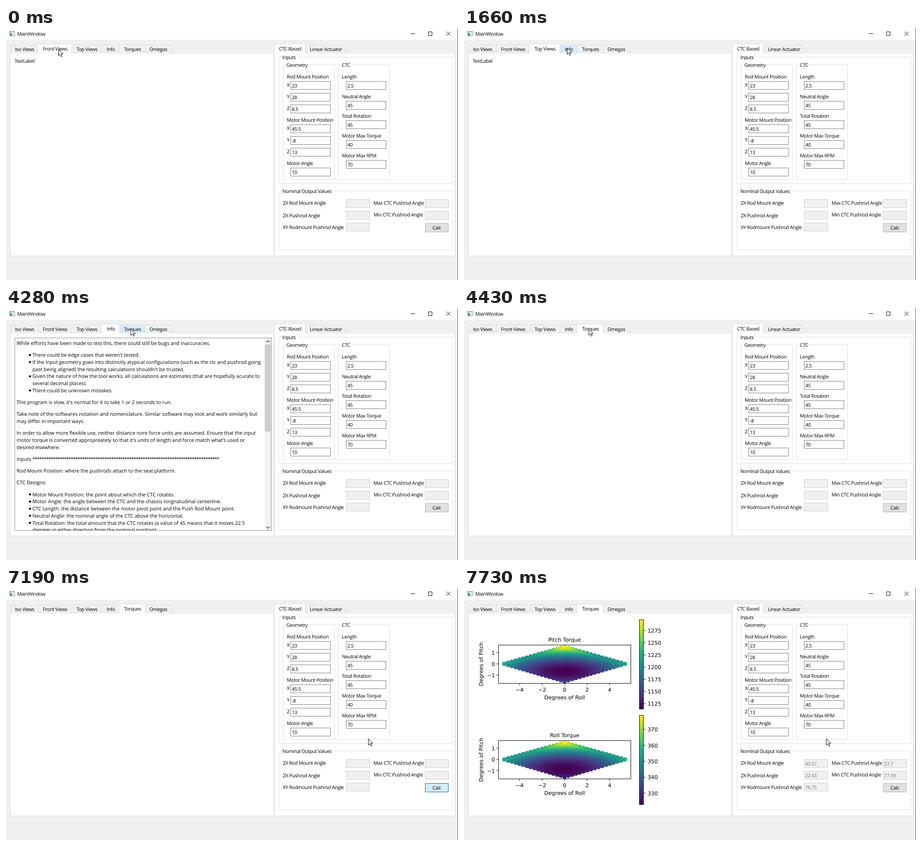
An HTML page that plays this animation: 1001 by 559 pixels, repeating every 8000 ms.

```html
<!DOCTYPE html>
<html lang="en">
<head>
<meta charset="utf-8">
<title>MainWindow</title>
<style>
  html, body { margin: 0; width: 100%; height: 100%; overflow: hidden; background: #f0f0f0; }
  svg { display: block; width: 100vw; height: 100vh; }
  text { font: 10.8px "Open Sans", "Noto Sans", sans-serif; letter-spacing: -.38px; fill: #000;
         white-space: pre; text-rendering: geometricPrecision; }
  .info text { font-size: 11px; letter-spacing: 0; }
  .plot text { font: 11.9px "DejaVu Sans", sans-serif; letter-spacing: 0; }
  .mid { text-anchor: middle; }
  .end { text-anchor: end; }
  .off { fill: #787878; }
</style>
</head>
<body>
<svg id="stage" viewBox="0 0 1001 559"></svg>
<script>
const NS = "http://www.w3.org/2000/svg";
const stage = document.getElementById("stage");

function add(parent, tag, attrs = {}, text) {
  const el = document.createElementNS(NS, tag);
  for (const k in attrs) el.setAttribute(k, attrs[k]);
  if (text !== undefined) el.textContent = text;
  parent.appendChild(el);
  return el;
}
const group = (parent, cls = "") => add(parent, "g", { class: cls });
const label = (p, x, y, s, cls = "") => add(p, "text", { x, y, class: cls }, s);
const fillBox = (p, x, y, w, h, fill) => add(p, "rect", { x, y, width: w, height: h, fill });
const line = (p, d, stroke = "#000", width = 1) =>
  add(p, "path", { d, stroke, "stroke-width": width, fill: "none" });
// Outlined box given by its outer pixel edges
const box = (p, x1, y1, x2, y2, fill, stroke) =>
  add(p, "rect", { x: x1 + .5, y: y1 + .5, width: x2 - x1, height: y2 - y1, fill, stroke });

const EDGE = "#dcdcdc", FIELD = "#7a7a7a";

// Title bar
fillBox(stage, 0, 0, 1001, 559, "#f0f0f0");
fillBox(stage, 0, 0, 1001, 26, "#fff");
box(stage, 7, 7, 19, 17, "#fff", "#8c9296");
fillBox(stage, 8, 8, 11, 2, "#c3c9cd");
fillBox(stage, 9, 11, 4, 6, "#3c8f78");
fillBox(stage, 14, 11, 4, 6, "#e2e5e7");
label(stage, 25, 17, "MainWindow");
line(stage, "M896 12.5H906M935.5 8.5H943.5V16.5H935.5ZM975.5 8L984.5 17M984.5 8L975.5 17");

// Panes
box(stage, 9, 55, 592, 505, "#fff", EDGE);
box(stage, 594, 55, 994, 505, "#fff", EDGE);

// Tabs
const names = ["Iso Views", "Front Views", "Top Views", "Info", "Torques", "Omegas"];
const edges = [10, 71, 145, 212, 251, 308, 365];

function makeTab(name, x1, x2) {
  const g = group(stage);
  const rect = box(g, x1, 37, x2, 55, "#f0f0f0", EDGE);
  const text = label(g, (x1 + x2) / 2 + .8, 51, name, "mid");
  return mode => {
    const on = mode === "on", grow = on ? 1 : 0;
    rect.setAttribute("x", x1 + .5 - grow);
    rect.setAttribute("width", x2 - x1 + 2 * grow);
    rect.setAttribute("y", on ? 35.5 : 37.5);
    rect.setAttribute("height", on ? 21 : 18);
    rect.setAttribute("fill", on ? "#fff" : mode === "hot" ? "#d8eaf9" : "#f0f0f0");
    // The open tab loses its bottom edge
    rect.setAttribute("stroke-dasharray", on ? `0 ${x2 - x1 + 2} 0` : "none");
    rect.removeAttribute("stroke-dasharray");
    foot.setAttribute("visibility", on ? "visible" : "hidden");
    text.setAttribute("y", on ? 50 : 51);
    if (on) stage.insertBefore(g, tabsEnd);
  };
  var foot;
}

function Tab(name, x1, x2) {
  const g = group(stage);
  const rest = group(g), open = group(g);
  const rect = box(rest, x1, 37, x2, 55, "#f0f0f0", EDGE);
  const cx = (x1 + x2) / 2 + .8;
  label(rest, cx, 51, name, "mid");
  fillBox(open, x1 - 1, 35, x2 - x1 + 3, 22, "#fff");
  line(open, `M${x1 - .5} 56V35.5H${x2 + 1.5}V56`, EDGE);
  label(open, cx, 50, name, "mid");
  return mode => {
    rest.style.display = mode === "on" ? "none" : "";
    open.style.display = mode === "on" ? "" : "none";
    rect.setAttribute("fill", mode === "hot" ? "#d8eaf9" : "#f0f0f0");
  };
}
const tabs = names.map((n, i) => Tab(n, edges[i], edges[i + 1]));
Tab("Linear Actuator", 664, 752)("off");
Tab("CTC Based", 595, 662)("on");

// Group boxes
function frame(x1, y1, x2, y2, title, tx, tw) {
  box(stage, x1, y1, x2, y2, "none", EDGE);
  fillBox(stage, tx - 2, y1 - 4, tw + 4, 9, "#fff");
  label(stage, tx, y1 + 4.5, title);
}
frame(604, 64, 989, 344, "Inputs", 612, 30);
frame(613, 81, 727, 335, "Geometry", 621, 46);
frame(735, 81, 849, 335, "CTC", 744, 18);
frame(604, 361, 989, 492, "Nominal Output Values", 612, 108);

function field(x, y, value) {
  box(stage, x, y, x + 88, y + 18, "#fff", FIELD);
  label(stage, x + 3, y + 14, value);
}
function axes(title, y, values) {
  label(stage, 622, y, title);
  values.forEach((v, i) => {
    label(stage, 622, y + 18 + i * 26.1, "XYZ"[i]);
    field(630, Math.round(y + 6 + i * 26.1), v);
  });
}
axes("Rod Mount Position", 112, ["23", "28", "8.5"]);
axes("Motor Mount Position", 208, ["45.5", "-8", "13"]);
label(stage, 622, 304, "Motor Angle");
field(630, 310, "10");
[["Length", "2.5"], ["Neutral Angle", "45"], ["Total Rotation", "45"],
 ["Motor Max Torque", "40"], ["Motor Max RPM", "70"]].forEach(([name, v], i) => {
  label(stage, 744, 112 + i * 43.7, name);
  field(753, Math.round(118 + i * 43.7), v);
});

// Outputs
const results = [];
function output(name, lx, ly, x, y, value) {
  label(stage, lx, ly, name);
  box(stage, x, y, x + 52, y + 18, "#f0f0f0", "#ccc");
  results.push(label(stage, x + 2.5, y + 14, value, "off"));
}
output("ZX Rod Mount Angle", 613, 392, 753, 380, "40.57");
output("ZX Pushrod Angle", 613, 420, 753, 406, "22.43");
output("XY Rodmount Pushrod Angle", 613, 446, 753, 432, "76.75");
output("Max CTC Pushrod Angle", 814, 392, 928, 380, "57.7");
output("Min CTC Pushrod Angle", 814, 418, 928, 406, "77.59");

const button = box(stage, 928, 433, 979, 452, "#e1e1e1", "#adadad");
label(stage, 954, 447, "Calc", "mid");
const buttonLook = {
  rest: ["#e1e1e1", "#adadad"],
  hot: ["#e5f1fb", "#0078d7"],
  down: ["#d8eaf9", "#0069bd"]
};

// Left pane contents
const blank = group(stage);
label(blank, 19, 77, "TextLabel");

const INFO = `While efforts have been made to test this, there could still be bugs and inaccuracies.

* There could be edge cases that weren't tested.
* If the input geometry goes into distinctly atypical configurations (such as the ctc and pushrod going
> past being aligned) the resulting calculations shouldn't be trusted.
* Given the nature of how the tool works, all calculations are estimates (that are hopefully acurate to
> several decimal places).
* There could be unknown mistakes.

This program is slow, it's normal for it to take 1 or 2 seconds to run.

Take note of the softwares notation and nomenclature. Similar software may look and work similarly but
may differ in important ways.

In order to allow more flexible use, neither distance nore force units are assumed. Ensure that the input
motor torque is converted appropreately so that it's units of length and force match what's used or
desired elsewhere.

Inputs #

Rod Mount Position: where the pushrods attach to the seat platform.

CTC Designs:

* Motor Mount Position: the point about which the CTC rotates.
* Motor Angle: the angle between the CTC and the chassis longnatudinal centerline.
* CTC Length: the distance between the motor pivot point and the Push Rod Mount point.
* Neutral Angle: the nominal angle of the CTC above the horizontal.
* Total Rotation: the total amount that the CTC rotates (a value of 45 means that it moves 22.5
> degrees in either direction from the nominal position).`;

const info = group(stage, "info");
box(info, 19, 66, 587, 493, "#fff", "#828790");
const clip = add(add(info, "clipPath", { id: "page" }), "rect", { x: 20, y: 67, width: 552, height: 426 });
const page = add(info, "g", { "clip-path": "url(#page)" });
let y = 82;
for (const row of INFO.split("\n")) {
  if (!row) { y += 10.45; continue; }
  const inset = /^[*>] /.test(row);
  if (row[0] === "*") add(page, "circle", { cx: 53, cy: y - 4, r: 2.3 });
  const el = label(page, inset ? 58.5 : 23.5, y, (inset ? row.slice(2) : row).replace("#", ""));
  if (row.endsWith("#")) add(el, "tspan", { style: "letter-spacing:-1.1px" }, "*".repeat(83));
  y += 15.75;
}
fillBox(info, 573, 67, 14, 426, "#f0f0f0");
fillBox(info, 573, 81, 13, 193, "#cdcdcd");
line(info, "M576.5 76L580 72.5L583.5 76M576.5 485L580 488.5L583.5 485", "#505050", 1.6);

// Plots
const VIRIDIS = ["440154", "472d7b", "3b528b", "2c728e", "21918c", "28ae80", "5ec962", "addc30", "fde725"]
  .map(h => [0, 2, 4].map(i => parseInt(h.substr(i, 2), 16)));
function viridis(v) {
  const p = Math.min(1, Math.max(0, v)) * 8, i = Math.min(7, Math.floor(p));
  return `rgb(${VIRIDIS[i].map((c, k) => Math.round(c + (VIRIDIS[i + 1][k] - c) * (p - i)))})`;
}

const plots = group(stage, "plot");
const ramp = add(plots, "linearGradient", { id: "ramp", x1: 0, y1: 1, x2: 0, y2: 0 });
VIRIDIS.forEach((c, i) => add(ramp, "stop", { offset: i / 8, "stop-color": `rgb(${c})` }));

function plot(top, title, value, bar) {
  const g = add(plots, "g", { transform: `translate(0 ${top})` });
  const U = 24.93, cx = 222.8, cy = 42.3, N = 16;
  for (let i = 0; i <= N; i++) for (let j = 0; j <= N; j++) {
    const dx = (i - j) / N * 5.36, s = (i + j) / N - 1;
    const dy = s * (s > 0 ? 1.5 : 1.55);
    add(g, "circle", { cx: cx + dx * U, cy: cy - dy * U, r: 4.9, fill: viridis(value(dx, dy)) });
  }
  box(g, 76, 0, 369, 85, "none", "#000");
  label(g, cx, -7, title, "mid");
  label(g, cx, 120.5, "Degrees of Roll", "mid");
  add(g, "text", { transform: "translate(41.5 43) rotate(-90)", class: "mid" }, "Degrees of Pitch");
  for (const n of [-4, -2, 0, 2, 4]) {
    line(g, `M${cx + n * U} 86v4`);
    label(g, cx + n * U, 103.5, String(n).replace("-", "\u2212"), "mid");
  }
  for (const n of [-1, 0, 1]) {
    line(g, `M76 ${cy - n * U}h-4`);
    label(g, 68.5, cy - n * U + 4.4, String(n).replace("-", "\u2212"), "end");
  }
  box(g, 388, -56, 397, 142, "url(#ramp)", "#000");
  for (let k = 0; k < bar.count; k++) {
    const ty = bar.y + k * bar.gap;
    line(g, `M398 ${ty}h4`);
    label(g, 406.5, ty + 4.4, bar.max - k * bar.step);
  }
}
const bowl = (a, b, low) => (x, y) => a * x * x + b * (y - low) ** 2;
plot(126, "Pitch Torque", bowl(.0175, .227, -.6), { max: 1275, step: 25, count: 7, y: -31.7, gap: 27.05 });
plot(338, "Roll Torque", bowl(.0168, .189, -.8), { max: 370, step: 10, count: 5, y: -24.2, gap: 35.35 });

line(stage, "M1000.5 0V559", "#555");
const cursor = add(stage, "path", {
  d: "M.5 .5V14.5L3.8 11.4L6.2 16.7L8.2 15.8L5.9 10.5H10.2Z", fill: "#fff", stroke: "#000"
});

// time, pointer x, pointer y, open tab, hovered tab, button state
const STEPS = [
  [0, 116, 47, 1, -1, "rest"],
  [150, 136, 47, 1, -1, "rest"],
  [290, 171, 47, 1, 2, "rest"],
  [440, 180, 47, 1, 2, "rest"],
  [860, 180, 47, 2, -1, "rest"],
  [1360, 198, 45, 2, -1, "rest"],
  [1510, 224, 45, 2, 3, "rest"],
  [1660, 228, 44, 2, 3, "rest"],
  [2920, 228, 44, 3, -1, "rest"],
  [3880, 238, 46, 3, -1, "rest"],
  [4005, 259, 46, 3, 4, "rest"],
  [4130, 272, 46, 3, 4, "rest"],
  [4280, 276, 46, 3, 4, "rest"],
  [4430, 276, 46, 4, -1, "rest"],
  [4710, 540, 240, 4, -1, "rest"],
  [4830, 773, 409, 4, -1, "rest"],
  [5380, 862, 424, 4, -1, "rest"],
  [5500, 926, 431, 4, -1, "rest"],
  [5650, 937, 438, 4, -1, "rest"],
  [5775, 945, 441, 4, -1, "hot"],
  [5900, 949, 442, 4, -1, "hot"],
  [6150, 949, 442, 4, -1, "down"],
  [7070, 880, 392, 4, -1, "down"],
  [7190, 802, 334, 4, -1, "down"],
  [7580, 802, 334, 4, -1, "down"],
  [7730, 802, 334, 4, -1, "rest"]
];
const LOOP = 8000, DONE = 7580;
const show = (el, on) => { el.style.display = on ? "" : "none"; };

let last = null;
function draw(time) {
  const step = STEPS.findLast(s => s[0] <= time);
  if (step === last) return;
  last = step;
  const [at, px, py, open, hot, state] = step;
  cursor.setAttribute("transform", `translate(${px} ${py})`);
  tabs.forEach((set, i) => set(i === open ? "on" : i === hot ? "hot" : "off"));
  const [fill, stroke] = buttonLook[state];
  button.setAttribute("fill", fill);
  button.setAttribute("stroke", stroke);
  show(blank, open < 3);
  show(info, open === 3);
  show(plots, at >= DONE);
  results.forEach(r => show(r, at >= DONE));
}

const start = performance.now();
function tick() {
  draw((performance.now() - start) % LOOP);
  requestAnimationFrame(tick);
}
draw(0);
tick();
</script>
</body>
</html>
```
